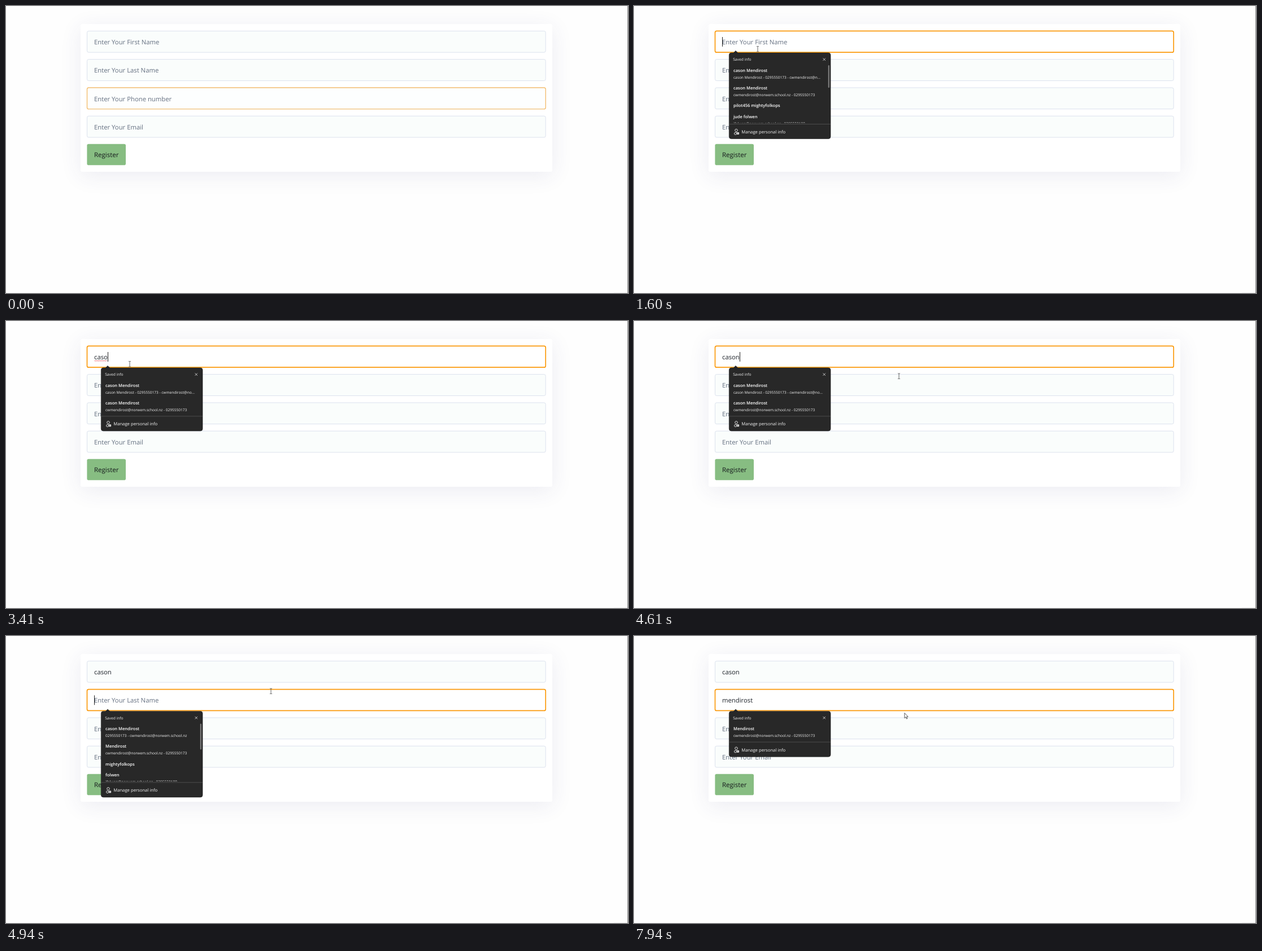
An HTML page that plays this animation: 1101 px wide and 509 px high, repeating every 8000 ms.

```html
<!DOCTYPE html>
<html lang="en">
<head>
<meta charset="utf-8">
<title>Registration form</title>
<style>
  html, body { margin: 0; width: 100%; height: 100%; overflow: hidden; background: #fefefe; }
  #card { position: absolute; left: 132px; top: 32px; width: 835px; height: 262px;
    border-radius: 3px; background: #fff; box-shadow: 0 7px 38px rgba(60, 60, 120, .09); }
  svg { position: absolute; left: 0; top: 0; display: block; }
  text { font-family: "Open Sans", "Noto Sans", sans-serif; white-space: pre; text-rendering: geometricPrecision; }
</style>
</head>
<body>
<div id="card"></div>
<svg id="stage" width="1101" height="509" viewBox="0 0 1101 509"></svg>
<script>
const LOOP = 8000, FONT = 11.3, TEXT_X = 156;
const FIRST = 'cason', LAST = 'mendirost', LAST_CAP = 'Mendirost';
const PHONE = '0295550173', EMAIL = 'cwmendirost@norwem.school.nz';
const CONTACT = `${EMAIL} - ${PHONE}`;
const CLIPPED = 'jfolwen@norwem.school.nz - 0295550188';
const LABELS = ['First Name', 'Last Name', 'Phone number', 'Email'];

// [time, characters typed]
const FIRST_KEYS = [[2070, 1], [2270, 2], [2340, 3], [3410, 4], [3550, 5]];
const LAST_KEYS = [[5550, 1], [5620, 2], [5740, 3], [6020, 4], [6110, 5], [6210, 6], [6410, 8], [7020, 9]];
// [time, x, y]
const POINTER = [[530, 645, 478], [1000, 300, 110], [1190, 215, 54], [1330, 219, 76],
  [4070, 219, 76], [4550, 469, 97.5], [7700, 469, 97.5], [7910, 478.5, 136.5]];

const stage = document.getElementById('stage');
const measure = document.createElement('canvas').getContext('2d');
const clamp = v => Math.max(0, Math.min(1, v));
const fieldTop = i => 44 + 50.25 * i;

function width(str, size) {
  measure.font = `${size}px "Open Sans", "Noto Sans", sans-serif`;
  return measure.measureText(str).width;
}

function text(x, y, size, fill, str, weight = 400) {
  return `<text x="${x}" y="${y}" font-size="${size}" fill="${fill}" font-weight="${weight}">${str}</text>`;
}

function rect(x, y, w, h, fill, more = '') {
  return `<rect x="${x}" y="${y}" width="${w}" height="${h}" fill="${fill}" ${more}/>`;
}

function typed(t, keys) {
  return keys.reduce((n, [at, count]) => t >= at ? count : n, 0);
}

// The caret restarts its blink at every key press.
function caretOn(t, focusAt, keys) {
  const last = keys.reduce((from, [at]) => t >= at ? at : from, focusAt);
  return Math.floor((t - last) / 525) % 2 === 0;
}

function field(i, focus, value) {
  const y = fieldTop(i);
  const box = (fill, stroke, w, opacity) => rect(143.5, y + .4, 811.7, 37.8, fill,
    `rx="2.8" stroke="${stroke}" stroke-width="${w}" opacity="${opacity}"`);
  let out = box('#fafdfc', '#dce2ee', 1, 1);
  if (focus > 0) out += box('#fff', '#fb9a0c', 1 + .7 * Math.max(0, focus - .6) / .4, focus);
  if (value === '') out += text(TEXT_X, y + 24.2, FONT, '#646f80', 'Enter Your ' + LABELS[i]);
  else if (value) out += text(TEXT_X, y + 24.2, FONT, '#1f242b', value);
  return out;
}

function caret(i, value) {
  return rect(Math.round(TEXT_X + width(value, FONT)), fieldTop(i) + 11, 1, 17, '#222');
}

function squiggle(x, y, w) {
  let d = `M${x} ${y}`;
  for (let k = 1; k * 1.5 < w; k++) d += `L${x + k * 1.5} ${y + (k % 2) * 1.5}`;
  return `<path d="${d}" fill="none" stroke="#e0404a" stroke-width=".8"/>`;
}

// Inline completion: typed part, highlighted remainder, key hint.
function completion(count) {
  const size = 7.3, head = LAST.slice(0, count), tail = LAST.slice(count);
  const x = TEXT_X + width(head, size), w = width(tail, size);
  return text(TEXT_X, 118, size, '#3c4043', head)
    + rect(x, 111, w, 9.5, '#c9dff8') + text(x, 118, size, '#1d3f72', tail)
    + rect(x + w + 2.5, 111.5, 11.5, 8, '#fafafa', 'rx="1" stroke="#b5b5a8" stroke-width=".7"')
    + text(x + w + 4.7, 117.4, 5, '#8a8a80', 'tab');
}

// rows: [title, detail]; the list is cut off at listEnd below the popup top.
function popup(top, rows, listEnd, scroll) {
  let y = top + 33.7, list = '';
  for (const [title, detail] of rows) {
    list += text(176, y, 7.5, '#fff', title, 600);
    if (detail) list += text(176, y + 12.1, 6.56, '#f2f2f2', detail);
    y += detail ? 31.2 : 19.8;
  }
  const end = top + listEnd, foot = end + 14;
  return `<path d="M175.5 ${top + .5}L180 ${top - 4}L184.500 ${top + .5}Z" fill="#282828"/>`
    + rect(168.3, top, 179.7, listEnd + 26.5, '#282828', 'rx="4" stroke="#1e1e1e" stroke-width=".6"')
    + text(175.2, top + 14.2, 6.7, '#f0f0f0', 'Saved info')
    + `<path d="M334.500 ${top + 9.5}l4.400 4.400m0 -4.400l-4.400 4.400" stroke="#eee" stroke-width=".8"/>`
    + `<clipPath id="list"><rect x="168" y="${top + 20}" width="180" height="${listEnd - 21.5}"/></clipPath>`
    + `<g clip-path="url(#list)">${list}</g>`
    + (scroll ? rect(343.7, top + 22, 2.2, 40 + (top > 100 ? 6 : 0), '#7d7d7d', 'rx="1.1"') : '')
    + rect(168.5, end, 179.3, .8, '#555')
    + `<g fill="none" stroke="#f0f0f0" stroke-width=".9"><circle cx="181" cy="${foot - 2.5}" r="2.300"/>`
    + `<path d="M181 ${foot + 5}h-2.500q-1 0 -1 -2q0 -1.500 1.500 -1.500h2"/></g>`
    + rect(181.3, foot + 1, 4.7, 3.8, '#f0f0f0', 'rx=".6"') + rect(182.5, foot + 2.5, 2.3, .8, '#333')
    + text(190.2, foot + 2.8, 7.7, '#f5f5f5', 'Manage personal info');
}

function firstPopup(count) {
  const owner = `${FIRST} ${LAST_CAP}`, start = `${owner} - ${PHONE} - cwmendirost@`;
  const rows = [[owner, start + (count ? 'no...' : 'n...')], [owner, CONTACT]];
  if (count < 2) rows.push(['pilot456 mightyfolkops']);
  if (count < 1) rows.push(['jude folwen', CLIPPED]);
  return popup(83, rows, count < 2 ? 126 : 85.5, !count);
}

function lastPopup(count) {
  const rows = count ? [[LAST_CAP, CONTACT]] : [
    [`${FIRST} ${LAST_CAP}`, `${PHONE} - ${EMAIL}`], [LAST_CAP, CONTACT],
    ['mightyfolkops'], ['folwen', CLIPPED]];
  return popup(133.4, rows, count > 1 ? 54.3 : 126, !count);
}

function pointer(time) {
  if (time < POINTER[0][0]) return '';
  const t = Math.max(POINTER[0][0], Math.floor(time / 70) * 70);
  let [, x, y] = POINTER[POINTER.length - 1];
  const next = POINTER.findIndex(p => p[0] > t);
  if (next > 0) {
    const a = POINTER[next - 1], b = POINTER[next], k = (t - a[0]) / (b[0] - a[0]);
    x = a[1] + (b[1] - a[1]) * k;
    y = a[2] + (b[2] - a[2]) * k;
  }
  const overField = LABELS.some((_, i) => y > fieldTop(i) && y < fieldTop(i) + 38.5);
  return `<g transform="translate(${x} ${y})">` + (overField
    ? '<path d="M-2 -4.500h1.500l.500 .500l.500 -.500h1.500M0 -4v8.500M-2 5h1.500l.500 -.500l.500 .500h1.500" fill="none" stroke="#555" stroke-width=".9"/>'
    : '<path d="M.4 0v9.200l2.100 -2l1.500 3.300l1.400 -.600l-1.500 -3.200h2.800z" fill="#fff" stroke="#333" stroke-width=".8"/>') + '</g>';
}

function scene(t) {
  const inFirst = t >= 1400 && t < 4740, inLast = t >= 4740;
  const n1 = typed(t, FIRST_KEYS), n2 = typed(t, LAST_KEYS);
  const first = FIRST.slice(0, n1), last = LAST.slice(0, n2);
  const completing = t >= 5740 && t < 6410;
  const fadeIn = start => clamp((t - start + 60) / 180);
  const focus = [
    inFirst ? fadeIn(1400) : inLast ? clamp((4900 - t) / 200) : 0,
    inLast ? fadeIn(4740) : 0,
    t < 70 ? .68 : t < 130 ? .3 : 0,
    0];
  const values = [first, completing ? null : last, '', ''];

  let out = rect(1100, 0, 1, 509, '#858585') + rect(1076, 508, 24, 1, '#f4f4f4');
  out += values.map((value, i) => field(i, focus[i], value)).join('');
  out += rect(143.4, 244.8, 68.6, 37.4, '#87bd82', 'rx="2.8"') + text(TEXT_X, 267.8, 11.5, '#15191c', 'Register');

  if (inFirst) {
    if (n1 === 4) out += squiggle(TEXT_X + .5, 69.8, width(first, FONT));
    if (caretOn(t, 1400, FIRST_KEYS)) out += caret(0, first);
    if (t >= 1470) out += firstPopup(n1);
  }
  if (inLast) {
    if (completing) out += completion(n2);
    else if (caretOn(t, 4740, LAST_KEYS)) out += caret(1, last);
    if (t >= 4810) out += lastPopup(n2);
  }
  return out + pointer(t);
}

let shown = '';
function draw() {
  const picture = scene(performance.now() % LOOP);
  if (picture !== shown) stage.innerHTML = shown = picture;
  requestAnimationFrame(draw);
}
draw();
</script>
</body>
</html>
```
